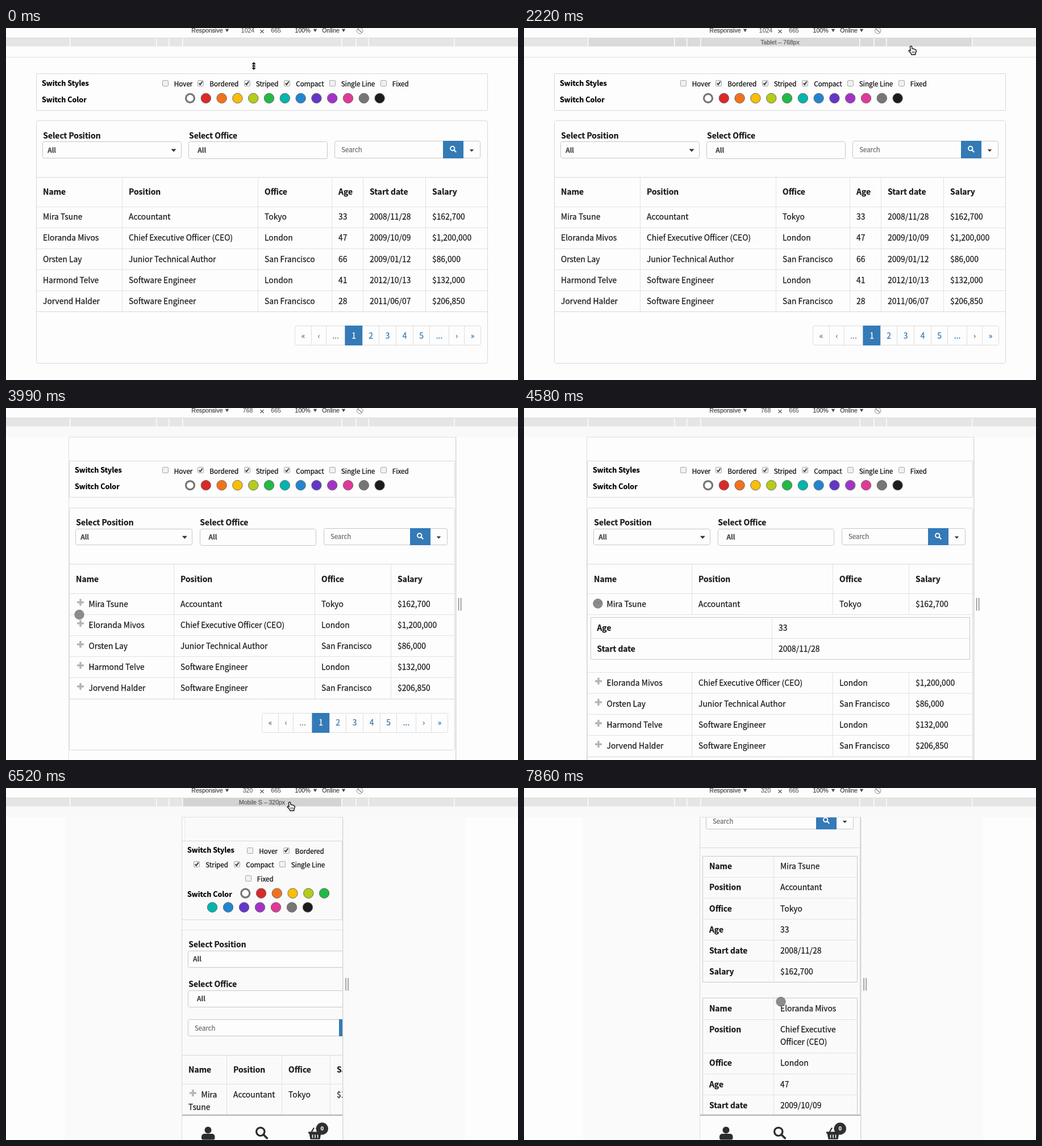
Write an HTML page with a canvas that moves like this. It is 901x621 px and loops after 8000 ms.

```html
<!DOCTYPE html>
<html lang="en">
<head>
<meta charset="utf-8">
<title>Responsive table</title>
<style>
html, body { margin: 0; width: 100%; height: 100%; overflow: hidden; background: #fdfdfd; }
canvas { display: block; width: 100%; height: 100%; }
</style>
</head>
<body>
<canvas id="stage"></canvas>
<script>
const W = 901, H = 621, LOOP = 8000, STEP = 148.1;
const SANS = '"Noto Sans CJK JP", "Noto Sans CJK SC", "Noto Sans CJK KR", "Noto Sans CJK TC", sans-serif';
const UI = '"Liberation Sans", sans-serif';
const LINE = "#e2e2e2", EDGE = "#d8d8d8", FIELD = "#c6c6c6", BLUE = "#337ab7", INK = "#1a1a1a";

const canvas = document.getElementById("stage");
const dpr = window.devicePixelRatio || 1;
canvas.width = Math.round(W * dpr);
canvas.height = Math.round(H * dpr);
const c = canvas.getContext("2d");

const HEADS = ["Name", "Position", "Office", "Age", "Start date", "Salary"];
const PEOPLE = [
  ["Mira Tsune", "Accountant", "Tokyo", "33", "2008/11/28", "$162,700"],
  ["Eloranda Mivos", "Chief Executive Officer (CEO)", "London", "47", "2009/10/09", "$1,200,000"],
  ["Orsten Lay", "Junior Technical Author", "San Francisco", "66", "2009/01/12", "$86,000"],
  ["Harmond Telve", "Software Engineer", "London", "41", "2012/10/13", "$132,000"],
  ["Jorvend Halder", "Software Engineer", "San Francisco", "28", "2011/06/07", "$206,850"]
];
const ALL = [0, 1, 2, 3, 4, 5], MAIN = [0, 1, 2, 5];
const STYLES = ["Hover", "Bordered", "Striped", "Compact", "Single Line", "Fixed"];
const COLORS = ["#fff", "#db2828", "#f2711c", "#fbbd08", "#b5cc18", "#21ba45", "#00b5ad",
  "#2185d0", "#6435c9", "#a333c8", "#e03997", "#767676", "#1b1c1d"];

// Pointer path: step, kind, x, y
const PATH = [
  [0, "resize", 436, 67], [2, "resize", 436, 67],
  [3, "hand", 431, 52], [6, "hand", 432, 22], [9, "hand", 432, 22],
  [12, "hand", 662, 33], [13, "hand", 662, 33], [15, "hand", 681, 32],
  [16, "hand", 683, 30], [19, "hand", 683, 30], [23, "hand", 520, 25], [25, "hand", 520, 25],
  [26, "touch", 330, 240], [27, "touch", 129, 364.5], [28, "touch", 129, 364.5],
  [29, "touch", 130, 345], [36, "touch", 130, 345], [37, "touch", 193, 302.5],
  [38, "arrow", 480, 5], [39, "arrow", 480, 5],
  [40, "hand", 492, 20], [41, "hand", 499, 25], [45, "hand", 499, 25], [46, "hand", 490, 36],
  [47, "touch", 470, 330], [48, "touch", 452, 548], [49, "touch", 452, 548], [53, "touch", 452, 377]
];

const snap = v => Math.round(v - 0.5) + 0.5;
const lerp = (a, b, f) => a + (b - a) * f;
const within = (k, a, b) => k >= a && k <= b;

// y is the middle of the capitals; a hairline stroke gives the heavier smoothing
function text(s, x, y, { size = 13.85, bold = false, color = INK, align = "left", font = SANS } = {}) {
  c.font = `${bold ? 700 : 400} ${size}px ${font}`;
  c.fillStyle = c.strokeStyle = color;
  c.lineWidth = 0.25;
  c.lineJoin = "round";
  c.textAlign = align;
  c.textBaseline = "alphabetic";
  c.fillText(s, x, y + size * 0.365);
  c.strokeText(s, x, y + size * 0.365);
}

function rect(x, y, w, h, color) {
  c.fillStyle = color;
  c.fillRect(x, y, w, h);
}

function seg(x1, y1, x2, y2, color = LINE, width = 1) {
  c.strokeStyle = color;
  c.lineWidth = width;
  c.beginPath();
  c.moveTo(x1, y1);
  c.lineTo(x2, y2);
  c.stroke();
}

const hline = (x1, x2, y, color) => seg(x1, snap(y), x2, snap(y), color);
const vline = (x, y1, y2, color) => seg(snap(x), y1, snap(x), y2, color);

function box(x1, y1, x2, y2, color = EDGE, r = 0, fill) {
  x1 = snap(x1); y1 = snap(y1);
  c.beginPath();
  c.roundRect(x1, y1, snap(x2) - x1, snap(y2) - y1, r);
  if (fill) { c.fillStyle = fill; c.fill(); }
  c.strokeStyle = color;
  c.lineWidth = 1;
  c.stroke();
}

function disc(x, y, r, fill, stroke, width = 1) {
  c.beginPath();
  c.arc(x, y, r, 0, Math.PI * 2);
  if (fill) { c.fillStyle = fill; c.fill(); }
  if (stroke) { c.strokeStyle = stroke; c.lineWidth = width; c.stroke(); }
}

function poly(points, fill, stroke) {
  c.beginPath();
  points.forEach(([x, y]) => c.lineTo(x, y));
  c.closePath();
  c.fillStyle = fill;
  c.fill();
  if (stroke) { c.strokeStyle = stroke; c.lineWidth = 1.4; c.lineJoin = "round"; c.stroke(); }
}

const caret = (x, y, w = 4.5, h = 5, color = "#333") =>
  poly([[x - w, y - h / 2], [x + w, y - h / 2], [x, y + h / 2]], color);

function lens(x, y, r, width, color) {
  disc(x, y, r, null, color, width);
  const d = r * 0.72;
  c.lineCap = "round";
  seg(x + d, y + d, x + r * 1.6, y + r * 1.6, color, width * 1.15);
  c.lineCap = "butt";
}

// Browser chrome
function toolbar(width) {
  const grey = "#6a6a6a", dark = "#484848";
  const word = (s, x, color = dark) => text(s, x, 4.6, { size: 10.6, font: UI, color });
  word("Responsive", 326.3);
  caret(389, 4.5, 3.2, 5.5, dark);
  text(String(width), 425.5, 4.6, { size: 10.5, font: UI, color: grey, align: "center" });
  seg(447.5, 3, 453.5, 9, "#555", 1.1);
  seg(453.5, 3, 447.5, 9, "#555", 1.1);
  word("665", 466.3, grey);
  word("100%", 508.5);
  caret(544, 4.5, 3.2, 5.5, dark);
  word("Online", 556.3);
  caret(594, 4.5, 3.2, 5.5, dark);
  disc(622.7, 4.8, 5.2, null, "#8a8a8a", 1);
  seg(619, 1.6, 626.4, 8, "#8a8a8a", 1.4);
}

function ruler(k) {
  const edges = [0, 112, 264, 286, 310, 590, 615, 637, 788, W];
  const tablet = within(k, 14, 21);
  const mobile = within(k, 4, 11) || within(k, 22, 25) || within(k, 40, 46);
  const shade = k === 14 ? "#dedede" : k === 15 ? "#dadada" : "#d3d3d3";
  rect(0, 17, W, 1, "#dadada");
  for (let i = 0; i < edges.length - 1; i++) {
    const lit = tablet ? within(i, 1, 7) : mobile && i === 4;
    const x = edges[i] + (i ? 1.5 : 0);
    rect(x, 18, edges[i + 1] - x, 14.5, lit ? shade : "#e5e5e5");
  }
  const label = tablet ? "Tablet – 768px" : mobile && k !== 4 ? "Mobile S – 320px" : "";
  text(label, 450.5, 25.5, { size: 10.5, font: UI, color: "#5c5c5c", align: "center" });
}

function device(L, R) {
  hline(L, R, 51.5, "#e0e0e0");
  vline(L, 51, H, "#dedede");
  vline(R, 51, H, "#d4d4d4");
  vline(R + 1, 55, H, "#ececec");
  for (const x of [R + 5.6, R + 9.6]) seg(x, 335, x, 357.5, "#858585", 1.4);
}

// Page parts
function check(x, y, on) {
  box(x - 5, y - 5, x + 5, y + 5, "#a9a9a9", 1.5, "#f1f1f1");
  if (!on) return;
  c.lineJoin = "miter";
  c.strokeStyle = "#3c3c3c";
  c.lineWidth = 1.9;
  c.beginPath();
  c.moveTo(x - 2.8, y);
  c.lineTo(x - 0.7, y + 2.4);
  c.lineTo(x + 3.2, y - 3.2);
  c.stroke();
}

function option(i, x, y) {
  check(x, y, within(i, 1, 3));
  text(STYLES[i], x + 15.8, y + 1.4, { size: 11.7, color: "#0c0c0c" });
}

function swatch(i, x, y) {
  if (i) disc(x, y, 8.7, COLORS[i], "#6b6b6b", 1);
  else disc(x, y, 7.5, COLORS[0], "#767676", 3.2);
}

const title = (s, x, y) => text(s, x, y, { size: 12.6, bold: true, color: "#000" });
const heading = (s, x, y) => text(s, x, y, { bold: true });

function select(x, y, w, h, indent, arrow) {
  box(x, y, x + w, y + h, FIELD, 3, "#fdfdfd");
  text("All", x + indent, y + 14.6, { size: 11.7, bold: true, color: "#444" });
  if (arrow) caret(x + w - 13, y + 15.2);
}

function search(x, y, w) {
  const r = snap(x + w), h = 29.3, top = snap(y);
  box(x, y, r, y + h, FIELD, 3, "#fdfdfd");
  text("Search", x + 11.5, y + 15, { size: 11.4, color: "#6e6e6e" });
  rect(r - 65.5, top - 0.5, 36, snap(y + h) - top + 1, BLUE);
  lens(r - 48.8, y + 12.6, 3.7, 1.9, "#fff");
  caret(r - 15, y + 16.3, 3.8, 4);
}

function pager(right, y) {
  const stops = [0, 29, 55, 88, 119, 148, 178, 208, 237, 271, 298, 327];
  const marks = ["«", "‹", "...", "1", "2", "3", "4", "5", "...", "›", "»"];
  const x = right - 327, top = snap(y);
  box(x, y, right, y + 34, "#dddddd", 3, "#fdfdfd");
  marks.forEach((m, i) => {
    const mid = x + (stops[i] + stops[i + 1]) / 2;
    if (i) vline(x + stops[i], y, y + 34, "#dddddd");
    if (i === 3) rect(x + 88, top - 0.5, 31, 35, BLUE);
    text(m, mid, y + 17, { align: "center", color: i < 3 ? "#777" : i === 3 ? "#fff" : BLUE });
  });
}

function plus(x, y, open) {
  seg(x - 6, y, x + 6, y, "#b4b4b4", 3.4);
  if (!open) seg(x, y - 6, x, y + 6, "#b4b4b4", 3.4);
}

// Label and value rows; returns the bottom edge
function card(L, R, split, top, fields, person) {
  let y = top;
  for (const f of fields) {
    const lines = person[f].split(/ (?=Officer)/);
    heading(HEADS[f], L + 11.5, y + 18.2);
    lines.forEach((s, j) => text(s, split + 11.5, y + 18.2 + 22 * j));
    if (f !== fields[0]) hline(L, R, y);
    y += 37.15 + 22 * (lines.length - 1);
  }
  vline(split, top, y);
  box(L, top, R, y, "#c9c9c9");
  return y;
}

// Bordered table; returns the bottom edge
function table(L, R, top, splits, fields, { breaks = /\n/, icons = false, open = false } = {}) {
  const xs = [L, ...splits];
  hline(L, R, top, EDGE);
  fields.forEach((f, i) => heading(HEADS[f], xs[i] + 11.6, top + 26.1));
  let y = top + 51.8, from = top;
  const rule = to => splits.forEach(x => vline(x, from, to));
  PEOPLE.forEach((person, n) => {
    hline(L, R, y);
    let most = 1;
    fields.forEach((f, i) => {
      const lines = person[f].split(breaks);
      most = Math.max(most, lines.length);
      lines.forEach((s, j) =>
        text(s, xs[i] + 11.5 + (icons && !i && !j ? 22.5 : 0), y + 18.2 + 22 * j));
    });
    if (icons) plus(L + 19.5, y + 15.3, open && !n);
    y += 37.1 + 22.2 * (most - 1);
    if (open && !n) {
      rule(y);
      hline(L, R, y);
      card(L + 5.5, R - 5.5, L + 325, y + 5, [3, 4], person);
      y += 102;
      from = y;
    }
  });
  rule(y);
  hline(L, R, y, EDGE);
  return y;
}

// Desktop and tablet page
function widePage(L, R, dy, fields, splits, opts) {
  box(L, 80.8 + dy, R, 145.4 + dy);
  title("Switch Styles", L + 9.5, 97.2 + dy);
  title("Switch Color", L + 9.5, 126.2 + dy);
  [280, 342.5, 424, 494.5, 574, 664].forEach((x, i) => option(i, x, 97.5 + dy));
  COLORS.forEach((_, i) => swatch(i, 324 + 27.8 * i, 123.9 + dy));

  const bottom = table(L, R, 263.3 + dy, splits, fields, opts);
  box(L, 163.8 + dy, R, bottom + 90.5, EDGE, 3);
  const w = (R - L - 64) / 3, gap = 13.7;
  const x1 = L + 11.2, x2 = x1 + w + gap, x3 = x2 + w + gap;
  heading("Select Position", x1 + 0.6, 189.5 + dy);
  heading("Select Office", x2 + 0.3, 189.5 + dy);
  select(x1, 200.7 + dy, w, 28.4, 8.5, true);
  select(x2, 200.8 + dy, w, 29.4, 15.5, false);
  search(x3, 199.9 + dy, R - 13 - x3);
  pager(R - 12, bottom + 25.3);
}

function mobilePage(cards, scroll) {
  const L = 309.5, R = 591.5, x = 320.5, w = cards ? 259 : 330.5;
  c.save();
  c.beginPath();
  c.rect(309, 52, 283, 525);
  c.clip();
  c.translate(0, -scroll);
  vline(314.5, 52, 93, "#eeeeee");
  box(L, 93.3, R, 232);
  title("Switch Styles", L + 9.5, 109.5);
  title("Switch Color", L + 9.5, 187.9);
  const spots = [[429.5, 110], [493, 110], [335.5, 134.5], [406.5, 134.5], [486, 134.5], [426, 159]];
  spots.forEach(([px, py], i) => option(i, px, py));
  COLORS.forEach((_, i) => i < 6 ? swatch(i, 421.3 + 27.75 * i, 185.7) : swatch(i, 363 + 28 * (i - 6), 210.5));
  heading("Select Position", 321.3, 276);
  select(x, 287.5, w, 28.5, 8.5, true);
  heading("Select Office", 321.3, 346);
  select(x, 357.5, w, 29, 15.5, false);
  search(x, 408.5, w);
  hline(L, R, 250.5);
  vline(L, 250, 1100, EDGE);
  if (cards) {
    vline(R, 250, 1100, EDGE);
    hline(L, R, 470.5, EDGE);
    let y = 485;
    for (const person of PEOPLE.slice(0, 2)) y = card(314.5, 586.5, 439.5, y, ALL, person) + 28;
  } else {
    table(L, 680, 471, [388.5, 485.5, 570.5], MAIN, { breaks: / (?=Tsune)/, icons: true });
  }
  c.restore();
  bottomNav();
}

function bottomNav() {
  const dark = "#2c2c2c";
  rect(310, 577, 282, 44, "#fcfcfc");
  rect(310, 575.5, 282, 1, "#dddddd");
  rect(310, 576.5, 282, 1.7, "#a8a8a8");
  disc(355.5, 603.5, 6, dark);
  c.beginPath();
  c.roundRect(344, 610, 23.5, 10.5, [5, 5, 3, 3]);
  c.fill();
  lens(447.8, 606.3, 7.2, 3.2, dark);
  // Basket
  seg(537, 608, 542, 599.5, dark, 2.2);
  seg(551, 608, 546, 599.5, dark, 2.2);
  rect(532, 606.5, 24, 3, dark);
  poly([[533.5, 609], [554.5, 609], [552.5, 619.8], [535.5, 619.8]], dark);
  for (const x of [539.5, 544, 548.5]) seg(x, 611.5, x, 617.5, "#fcfcfc", 1.6);
  disc(556.3, 601, 10.7, "#303030");
  text("0", 556.3, 601, { size: 9.5, bold: true, color: "#fff", align: "center" });
}

// Pointers
const POINTERS = {
  resize() {
    for (const [color, width] of [["#fff", 4], ["#111", 1.6]]) {
      seg(0, -5.5, 0, 5.5, color, width);
      seg(-3, 0, 3, 0, color, width);
    }
    poly([[-3.7, -3], [0, -7], [3.7, -3]], "#111");
    poly([[-3.7, 3], [0, 7], [3.7, 3]], "#111");
  },
  hand() {
    poly([[-1.7, 1], [-0.5, 0], [0.8, 0], [1.7, 1.2], [2, 4.6], [4.6, 4.8], [7, 5.6], [9, 6.8], [9.3, 9],
      [8.2, 12], [7.6, 15], [0.8, 15], [0, 12.6], [-3.7, 9], [-3.6, 7.4], [-2.2, 7.2], [-0.8, 8.4]], "#fff", "#111");
    for (const x of [2.2, 4.2, 6.2]) seg(x, 9, x, 12.5, "#333", 0.9);
  },
  arrow() {
    poly([[0, 0], [0, 13], [3, 10.3], [5, 15], [7, 14.1], [5, 9.6], [9, 9.4]], "#111", "#fff");
  },
  touch() {
    disc(0, 0, 8.2, "rgba(128,128,128,.9)", "rgba(112,112,112,.8)", 1);
  }
};

function pointer(k) {
  let i = PATH.length - 1;
  while (PATH[i][0] > k) i--;
  const [k0, kind, x, y] = PATH[i];
  const [k1, , nx, ny] = PATH[i + 1] || PATH[i];
  const f = k1 > k0 ? (k - k0) / (k1 - k0) : 0;
  c.save();
  c.translate(lerp(x, nx, f), lerp(y, ny, f));
  POINTERS[kind]();
  c.restore();
}

function draw(t) {
  // The picture advances in even steps
  const k = Math.min(53, Math.floor((t + 13) / STEP));
  const width = k < 18 ? 1024 : k < 44 ? 768 : 320;
  c.setTransform(canvas.width / W, 0, 0, canvas.height / H, 0, 0);
  rect(0, 0, W, H, "#fdfdfd");

  if (width === 1024) {
    hline(0, W, 51.5, "#e0e0e0");
    widePage(53.5, 847.5, 0, ALL, [204.5, 443.5, 573.5, 628.5, 738.5]);
  } else if (width === 768) {
    rect(0, 33, W, 18.5, "#f9f9f9");
    device(110.5, 791);
    if (k < 20) {
      widePage(111.5, 789.5, 12.4, ALL, [239.5, 442.5, 553.5, 601.5, 696.5],
        { breaks: / (?=\(|Francisco|Halder)/ });
    } else {
      widePage(111.5, 789.5, 12.4, MAIN, [295.5, 543.5, 677.5],
        { icons: true, open: within(k, 30, 36) });
    }
  } else {
    rect(0, 33, W, 18.5, "#f9f9f9");
    rect(104, 51, 704, H - 51, "#fafafa");
    device(309.5, 592.5);
    const f = Math.max(0, Math.min(1, (k - 49) / 4));
    mobilePage(k >= 46, 365 * f * f * (3 - 2 * f));
  }
  toolbar(width);
  ruler(k);
  pointer(k);
}

const start = performance.now();
function tick() {
  draw((performance.now() - start) % LOOP);
  requestAnimationFrame(tick);
}
tick();
</script>
</body>
</html>
```
